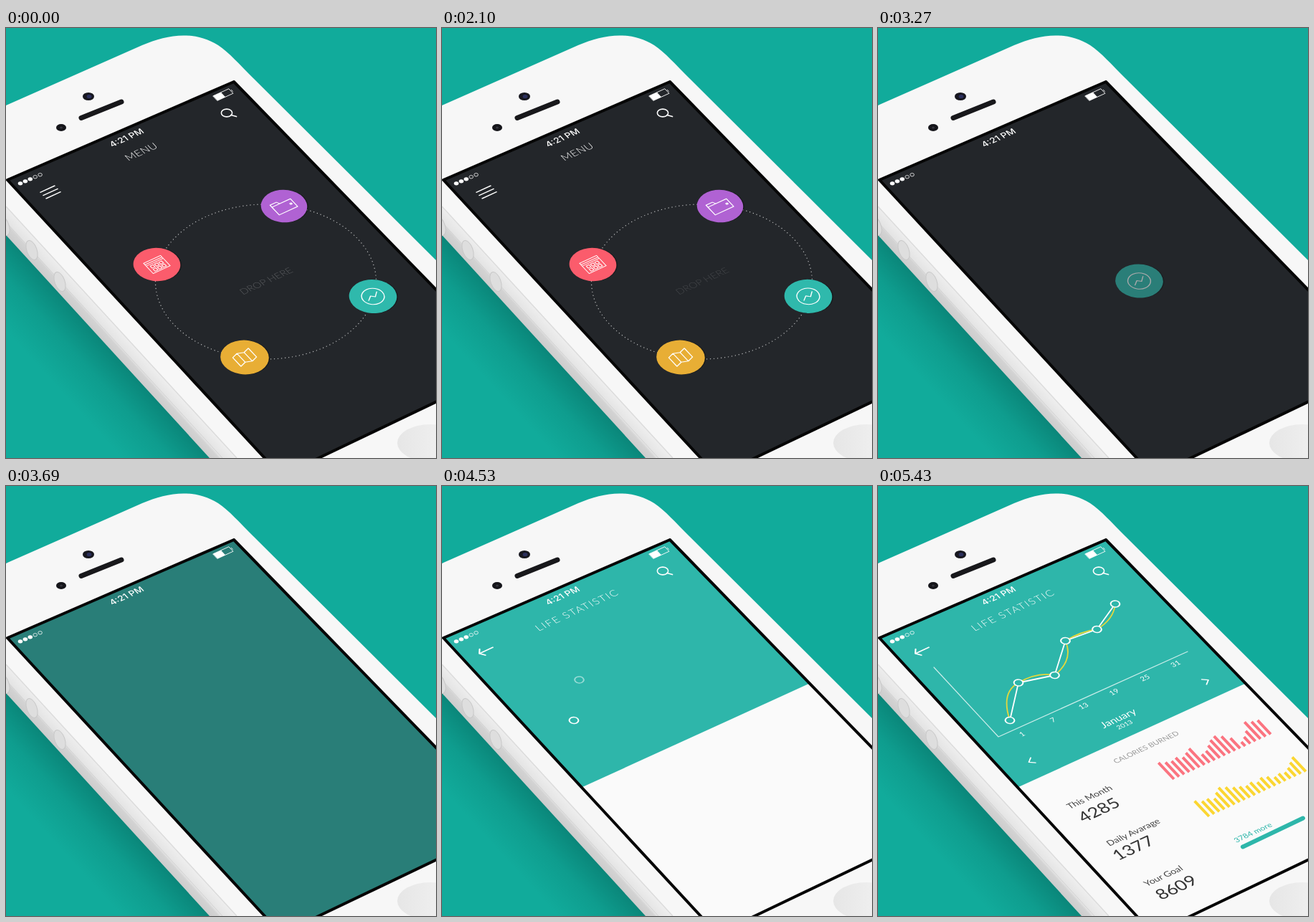
Animation, 600 px wide and 600 px high, one loop 6.45 s. Source, as an HTML page:

```html
<!DOCTYPE html>
<html lang="en">
<head>
<meta charset="utf-8">
<title>Menu to statistics</title>
<style>
  html, body { margin: 0; width: 100%; height: 100%; overflow: hidden; background: #11ab9b; }
  svg { display: block; width: 100vw; height: 100vh; }
  text { font-family: Lato, "Open Sans", sans-serif; text-anchor: middle; }
  .line { fill: none; stroke: #fff; stroke-linecap: round; stroke-linejoin: round; }
</style>
</head>
<body>
<svg id="stage" viewBox="0 0 600 600"></svg>
<script>
const LOOP = 6450, STEP = 30;
const CENTER = [363, 353.5];
const TEAL = '#2eb6aa';
// Corners of the phone screen: top left, top right, bottom right, bottom left.
const [TL, TR, BR, BL] = [[2, 212], [318, 75], [704, 472], [384, 625]];

const lerp = (a, b, k) => a + (b - a) * k;
const mix = (p, q, k) => [lerp(p[0], q[0], k), lerp(p[1], q[1], k)];
const sine = k => (1 - Math.cos(Math.PI * k)) / 2;
const easeOut = k => 1 - (1 - k) ** 2;

// Lays flat artwork onto the tilted screen plane.
const tilt = (x, y) => `translate(${x} ${y}) matrix(.99 -.455 .675 .715 0 0)`;
const flat = (x, y, art, attrs = '') => `<g transform="${tilt(x, y)}" ${attrs}>${art}</g>`;
const label = (x, y, str, size, fill = '#fff', attrs = '') =>
  flat(x, y, `<text y="${size * .36}" font-size="${size}" fill="${fill}" ${attrs}>${str}</text>`);
const stroke = (d, width = 1.2, attrs = '') =>
  `<path class="line" d="${d}" stroke-width="${width}" ${attrs}/>`;
const drawn = (id, d, width, attrs = '') =>
  stroke(d, width, `id="${id}" pathLength="1" stroke-dasharray="1 2" ${attrs}`);

const cells = [-8, -2, 4].flatMap(x => [-2, 4].map(y => `M${x} ${y}h4v4h-4z`)).join('');
const buttons = [
  { home: [210.5, 330], r: 27.4, color: '#fb5c6c', icon: stroke('M-12-10H12V10H-12ZM-12-7H12M-12-4.5H12' + cells, 1) },
  { home: [388, 248.5], r: 26.9, color: '#b062d3', icon: stroke('M-13-6H13V9H-13ZM-13-6V-10H-4L-2-6M8 0v2h2v-2z') },
  { home: [512, 374.5], r: 27.8, color: '#2fb9ac', icon: stroke('M-13.3 0a13.3 13.3 0 1 0 26.6 0a13.3 13.3 0 1 0-26.6 0M-8 3L-2-2L2 2L8-4') },
  { home: [333, 459.5], r: 28.2, color: '#e8ae35', icon: stroke('M-12-7L-4-10L4-7L12-10V7L4 10L-4 7L-12 10ZM-4-10V7M4-7V10') }
];

const points = [[184, 327], [196, 274.5], [246.5, 264], [261.5, 216], [305.5, 200], [331, 164.5]];
const bends = [[171, 288], [222, 259], [273, 243], [283, 203], [329, 186]];
const trend = 'M' + points.join('L');
const curve = 'M' + points[0] + bends.map((b, i) => `Q${b} ${points[i + 1]}`).join('');

const charts = [
  { x: 413, y: 409, color: '#fb7480', heights: [32, 28, 26, 28, 24, 28, 32, 16, 18, 24, 30, 33, 28, 20, 8, 13, 20, 33, 29, 27] },
  { x: 462, y: 461, color: '#fbd632', heights: [30, 25, 25, 21, 28, 33, 29, 24, 21, 18, 20, 16, 20, 17, 12, 14, 12, 16, 22, 28] }
];
const stats = [
  [295, 434, 'This Month', 308, 452, '4285'],
  [356, 483, 'Daily Avarage', 356, 505, '1377'],
  [398, 544, 'Your Goal', 416, 560, '8609']
];

const search = '<ellipse class="line" cx="308" cy="118.5" rx="7.6" ry="5.4" stroke-width="1.6"/>' +
  stroke('M314 121.5L321.5 123.5', 1.8);
const screenPath = `M${TL}L${TR}L${BR}L${BL}Z`;

const phone = `
  <path d="M0 285L290 600H0Z" fill="url(#shadow)"/>
  <path d="M0 220V289L284 600H340Z" fill="url(#side)"/>
  <path d="M0 271L302 600" stroke="#d2d2d2"/>
  <path d="M0 108L190 24C225 9 262 3 296 24C312 35 325 50 345 70L600 324V600H322L0 249Z" fill="#f7f7f7"/>
  <path d="M0 249L322 600" stroke="#dcdcdc" stroke-width="1.5"/>
  ${[[-3, 276], [36, 310], [75, 354]].map(([x, y]) =>
    `<ellipse cx="${x}" cy="${y}" rx="7" ry="14" transform="rotate(-20 ${x} ${y})" fill="#dedede" stroke="#c8c8c8"/>`).join('')}
  <ellipse cx="115" cy="95.5" rx="8" ry="5.6" fill="#17171f"/>
  <ellipse cx="116" cy="95.5" rx="3.4" ry="2.6" fill="#2b2f5c"/>
  <ellipse cx="77" cy="139" rx="7" ry="5" fill="#15151a"/>
  <ellipse cx="77" cy="139" rx="2" ry="1.5" fill="#34343c"/>
  <path d="M105 125.5L161 103" stroke="#18181b" stroke-width="7" stroke-linecap="round"/>
  <ellipse cx="592" cy="579" rx="46" ry="26" fill="url(#home)"/>`;

const status = `
  ${[0, 1, 2, 3, 4].map(i => `<ellipse cx="${20 + i * 6.9}" cy="${216.8 - i * 3}" rx="${i < 3 ? 3.3 : 2.8}" ry="${i < 3 ? 2.6 : 2.2}"
    fill="${i < 3 ? '#fff' : 'none'}" stroke="#fff" stroke-width="${i < 3 ? 0 : .8}"/>`).join('')}
  ${label(168, 153, '4:21 PM', 12, '#fff', 'style="font-family:Inter,sans-serif" font-weight="500"')}
  ${flat(303, 93, '<path d="M-11-4.5H0V4.5H-11Z" fill="#fff"/>' + stroke('M-11-4.5H11V4.5H-11ZM12.5-1.5V1.5', .8))}`;

const menu = `
  <g id="menuHead">
    ${flat(62, 229, stroke('M-10-6H10M-10 0H10M-10 6H10', 1.6))}
    ${label(188.5, 172.5, 'MENU', 14, '#fff', 'font-weight="300" letter-spacing=".3"')}
    ${search}
  </g>
  <ellipse id="ring" cx="362.5" cy="354" rx="154" ry="108" class="line" stroke-width="1.4" stroke-dasharray="0 5" stroke-opacity=".7"/>
  <g id="drop">${label(363, 353, 'DROP HERE', 13, '#fff', 'font-weight="300"')}</g>
  ${buttons.map((b, i) => `<g id="button${i}">
    <circle cx="1.2" cy=".8" r="${b.r}" fill="#000" opacity=".3"/>
    <circle r="${b.r}" fill="${b.color}"/>${b.icon}</g>`).join('')}`;

const report = `
  <path id="panel" fill="#fafafa"/>
  <g id="reportHead">
    ${flat(61.5, 229.5, stroke('M9.5 0H-9.5M-5-6L-9.5 0L-5 6', 1.8))}
    ${label(188.5, 173, 'LIFE STATISTIC', 14, '#fff', 'font-weight="300" letter-spacing="1.5"')}
    ${search}
  </g>
  ${drawn('axes', 'M78 253L168 350L432 231', 1.2, 'stroke-opacity=".75"')}
  <g id="dates">
    ${[1, 7, 13, 19, 25, 31].map((n, i) => label(201 + i * 42.8, 346 - i * 19.6, n, 10)).join('')}
    ${label(335, 324, 'January', 14)}
    ${label(344, 333, '2013', 9)}
    ${flat(213.5, 384, stroke('M3-5L-3 0L3 5', 1.5))}
    ${flat(458, 272, stroke('M-3-5L3 0L-3 5', 1.5))}
  </g>
  ${drawn('curve', curve, 1.8, 'style="stroke:#e3d83c"')}
  ${drawn('trend', trend, 1.8)}
  ${points.map((p, i) => `<g id="point${i}"><circle r="5.3" fill="${TEAL}" stroke="#fff" stroke-width="1.7"/></g>`).join('')}
  <g id="caption">${label(374, 364.5, 'CALORIES BURNED', 10, '#999')}</g>
  ${stats.map(([x, y, name, nx, ny, value], i) => `<g id="stat${i}">
    ${label(x, y, name, 12.2, '#444')}${label(nx, ny, value, 23, '#333')}</g>`).join('')}
  ${charts.map((c, i) => `<path id="chart${i}" fill="none" stroke="${c.color}" stroke-width="4"/>`).join('')}
  <g id="more">${label(523, 483.5, '3784 more', 10.6, TEAL)}</g>
  ${drawn('goal', 'M509 503.5L593 463.5', 6, `style="stroke:${TEAL}"`)}`;

document.getElementById('stage').innerHTML = `
  <defs>
    <linearGradient id="shadow" gradientUnits="userSpaceOnUse" x1="140" y1="440" x2="72" y2="502">
      <stop stop-color="#00524a" stop-opacity=".42"/><stop offset=".45" stop-color="#00524a" stop-opacity=".16"/>
      <stop offset="1" stop-color="#00524a" stop-opacity="0"/>
    </linearGradient>
    <linearGradient id="side" gradientUnits="userSpaceOnUse" x1="150" y1="412" x2="128" y2="432">
      <stop stop-color="#eee"/><stop offset=".5" stop-color="#e4e4e4"/><stop offset=".6" stop-color="#d3d3d3"/><stop offset="1" stop-color="#cbcbcb"/>
    </linearGradient>
    <linearGradient id="home"><stop stop-color="#e6e6e6"/><stop offset="1" stop-color="#f4f4f4"/></linearGradient>
    <clipPath id="screen"><path d="${screenPath}"/></clipPath>
  </defs>
  <rect width="600" height="600" fill="#11ab9b"/>
  ${phone}
  <g clip-path="url(#screen)">
    <path d="${screenPath}" fill="#23262a"/>
    ${menu}
    <path id="fill" d="${screenPath}" fill="${TEAL}"/>
    ${report}
  </g>
  <path d="${screenPath}" fill="none" stroke="#050505" stroke-width="4" stroke-linejoin="round"/>
  ${status}`;

const el = id => document.getElementById(id);
const fade = (id, k) => el(id).setAttribute('opacity', k);
const move = (id, value) => el(id).setAttribute('transform', value);
const reveal = (id, k) => {
  el(id).setAttribute('stroke-dashoffset', 1 - k);
  el(id).setAttribute('visibility', k > 0 ? 'visible' : 'hidden');
};

function render(t) {
  const seg = (from, to) => Math.min(1, Math.max(0, (t - from) / (to - from)));

  // Menu: header drops in, buttons fly out of the centre, one is dragged back.
  const enter = seg(60, 540), leave = 1 - seg(2790, 3060);
  const lift = -6 * (1 - easeOut(enter));
  fade('menuHead', enter * leave);
  move('menuHead', `translate(${lift} ${lift})`);
  fade('ring', enter * leave);
  fade('drop', .24 * seg(1380, 1740) * (1 - seg(2070, 2145)));
  buttons.forEach((b, i) => {
    const shown = seg(690 + 180 * i, 870 + 180 * i);
    const dragged = i === 2;
    let pos = mix(CENTER, b.home, easeOut(shown));
    if (dragged) pos = mix(pos, [364.5, 353], sine(seg(2070, 2640)));
    move('button' + i, tilt(...pos));
    fade('button' + i, shown * (dragged ? 1 - seg(3150, 3450) : leave));
  });

  // Report: the screen turns teal and the white panel rises.
  fade('fill', seg(3450, 3840));
  const edge = lerp(1, .505, sine(seg(3840, 4440)));
  el('panel').setAttribute('d', `M${mix(TL, BL, edge)}L${mix(TR, BR, edge)}L${BR}L${BL}Z`);
  fade('reportHead', seg(4080, 4320));

  points.forEach(([x, y], i) => {
    const k = seg(4380 + 90 * i, 4500 + 90 * i), drop = 9 * (1 - k);
    move('point' + i, tilt(x - drop, y - drop * .9));
    fade('point' + i, k);
  });
  reveal('axes', sine(seg(4890, 5130)));
  fade('dates', seg(4980, 5220));
  reveal('trend', sine(seg(4920, 5280)));
  reveal('curve', sine(seg(5010, 5370)));

  fade('caption', seg(4950, 5130));
  stats.forEach((s, i) => fade('stat' + i, seg(4980 + 90 * i, 5190 + 90 * i)));
  charts.forEach((c, i) => {
    const bars = c.heights.map((h, n) => {
      const k = h * easeOut(seg(4980 + 90 * i + 12 * n, 5110 + 90 * i + 12 * n));
      return `M${c.x + 7.1 * n} ${c.y - 3.3 * n}l${-.675 * k} ${-.715 * k}`;
    });
    el('chart' + i).setAttribute('d', bars.join(''));
  });
  fade('more', seg(5160, 5370));
  reveal('goal', sine(seg(5160, 5430)));
}

function tick() {
  const t = Math.floor(performance.now() % LOOP / STEP) * STEP;
  render(t < 90 ? 1900 : t); // the loop opens on the complete menu
  requestAnimationFrame(tick);
}
tick();
</script>
</body>
</html>
```
